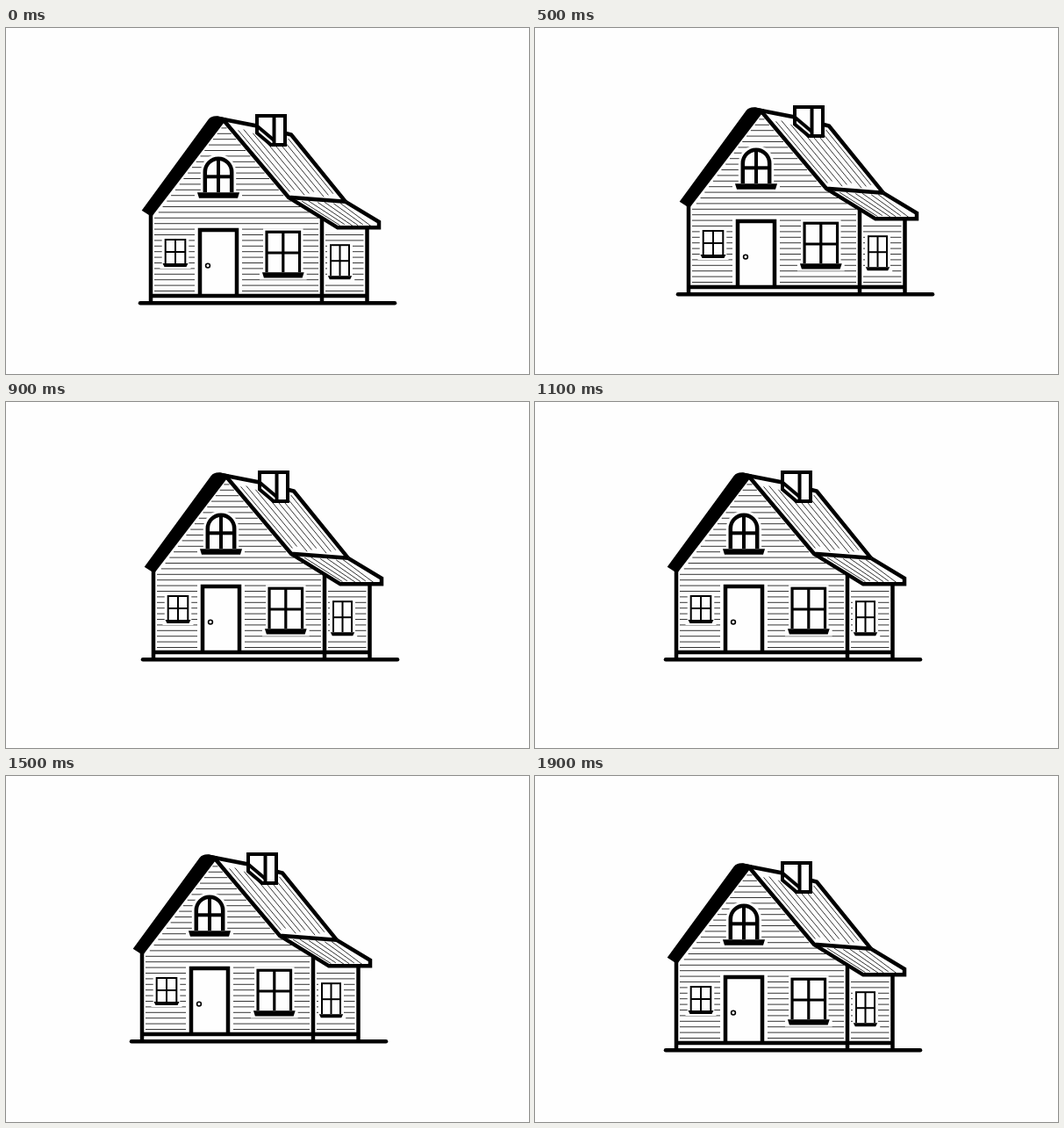
An HTML page with a canvas for the animation above (2 s loop, 596 by 394 pixels).

```html
<!DOCTYPE html>
<html lang="en">
<head>
<meta charset="utf-8">
<title>Floating house</title>
<style>
html, body { margin: 0; width: 100%; height: 100%; overflow: hidden; background: #fefefe; }
canvas { display: block; }
</style>
</head>
<body>
<canvas id="stage" width="596" height="394"></canvas>
<script>
const stage = document.getElementById('stage');
const ctx = stage.getContext('2d');
const INK = '#000', PAPER = '#fefefe';
const LOOP = 2000, STEPS = 20, RADIUS = 10;
const BOLD = 4.5, FINE = 0.8, GAP = 4;

// Walls
const LEFT = 165, POST = 360, RIGHT = 411.5, FLOOR = 305, GROUND = 313.2;
const ROW = 6.4;

// Roof corners
const PEAK = [248, 105], RIDGE = [325, 121.5];
const VALLEY = [322, 192.8], EAVE = [387, 197.8];
const PORCH = [378, 227.3], TIP = [425, 227.3];
const TIP_TOP = [TIP[0], TIP[1] - 6.5];
const GABLE_FOOT = [LEFT + 1, 215];

const mix = (a, b, k) => [a[0] + (b[0] - a[0]) * k, a[1] + (b[1] - a[1]) * k];
const xAt = (a, b, y) => mix(a, b, (y - a[1]) / (b[1] - a[1]))[0];

function trace(points, closed) {
  ctx.beginPath();
  for (const point of points) ctx.lineTo(...point);
  if (closed) ctx.closePath();
}

function line(width, ...points) {
  trace(points);
  ctx.lineWidth = width;
  ctx.stroke();
}

function fill(color) {
  ctx.fillStyle = color;
  ctx.fill();
}

function clear(x, y, w, h) {
  ctx.fillStyle = PAPER;
  ctx.fillRect(x, y, w, h);
}

// Parallel lines from edge a-b to edge c-d, with uneven ends
function hatch(a, b, c, d, count) {
  for (let i = 1; i < count; i++) {
    const top = mix(a, b, i / count), foot = mix(c, d, i / count);
    line(FINE, mix(top, foot, 0.08 + i % 2 * 0.03), mix(top, foot, 0.95 - i % 3 * 0.03));
  }
}

function siding() {
  for (let y = FLOOR - 5.5; y > PEAK[1] + 8; y -= ROW) {
    const left = Math.max(LEFT, xAt(PEAK, GABLE_FOOT, y)) + GAP;
    const slope = y < VALLEY[1] ? xAt(PEAK, VALLEY, y) : xAt(VALLEY, PORCH, y);
    const right = Math.min(POST, slope) - GAP;
    if (right > left) line(FINE, [left, y], [right, y]);
    if (y > PORCH[1] + GAP) line(FINE, [POST + GAP, y], [RIGHT - GAP, y]);
  }
}

function sill(cx, y, w, depth) {
  clear(cx - w / 2 - 3, y, w + 6, depth + 2);
  trace([[cx - w / 2, y], [cx + w / 2, y], [cx + w / 2 - 2, y + depth], [cx - w / 2 + 2, y + depth]]);
  fill(INK);
}

function pane(cx, cy, w, h, weight) {
  const x = cx - w / 2, y = cy - h / 2;
  clear(x - GAP, y - GAP, w + GAP * 2, h + GAP * 2);
  ctx.lineWidth = weight;
  ctx.strokeRect(x, y, w, h);
  line(weight, [cx, y], [cx, y + h]);
  line(weight, [x, cy], [x + w, cy]);
  sill(cx, y + h - weight / 2, w + weight * 3.2, weight * 2);
}

function archWindow(cx, cy, r, foot) {
  const arch = radius => {
    ctx.beginPath();
    ctx.moveTo(cx - radius, foot);
    ctx.arc(cx, cy, radius, Math.PI, 0);
    ctx.lineTo(cx + radius, foot);
  };
  arch(r + GAP + 1);
  fill(PAPER);
  arch(r);
  ctx.lineWidth = BOLD;
  ctx.stroke();
  line(4, [cx, cy - r], [cx, foot]);
  line(4, [cx - r, cy + 5.3], [cx + r, cy + 5.3]);
  sill(cx, foot, r * 3.16, 6.5);
}

function door(x, y, w) {
  clear(x - GAP - 2, y - GAP, w + GAP * 2 + 4, FLOOR - y);
  line(BOLD, [x, FLOOR], [x, y], [x + w, y], [x + w, FLOOR]);
  ctx.beginPath();
  ctx.arc(x + 9, y + 40.6, 2.4, 0, Math.PI * 2);
  ctx.lineWidth = 1.6;
  ctx.stroke();
}

function frame() {
  line(BOLD, [LEFT, GABLE_FOOT[1] - 7], [LEFT, GROUND]);
  line(BOLD, [POST, 216], [POST, GROUND]);
  line(BOLD, [RIGHT, PORCH[1]], [RIGHT, GROUND]);
  line(BOLD, [LEFT, FLOOR], [RIGHT, FLOOR]);
  ctx.lineCap = 'round';
  line(BOLD, [LEFT - 12, GROUND], [RIGHT + 31.5, GROUND]);
  ctx.lineCap = 'butt';
}

function roof() {
  hatch(PEAK, RIDGE, VALLEY, EAVE, 9);
  hatch(VALLEY, EAVE, PORCH, TIP, 7);
  line(BOLD, [240, 102.5], [286, 111.5], RIDGE, EAVE);
  line(BOLD, PEAK, VALLEY, EAVE);
  line(BOLD, VALLEY, PORCH, TIP, TIP_TOP, EAVE);

  // Thick left slope with a rounded top
  ctx.beginPath();
  ctx.moveTo(154.7, 207.7);
  ctx.lineTo(230.7, 104);
  ctx.quadraticCurveTo(234, 100, 240, 100.3);
  ctx.lineTo(PEAK[0] + 3, 102.5);
  ctx.lineTo(PEAK[0] + 1, PEAK[1] + 2);
  ctx.lineTo(...GABLE_FOOT);
  fill(INK);
}

function chimney(x, y, w, h) {
  const divider = x + w * 0.61;
  trace([[x, y], [x + w, y], [x + w, y + h], [x + w / 2, y + h], [x, y + h - 13.5]], true);
  fill(PAPER);
  ctx.lineWidth = 4;
  ctx.stroke();
  line(4, [x, y + 11.5], [divider, y + 28]);
  line(4, [divider, y], [divider, y + h]);
}

function house() {
  siding();
  archWindow(242, 164, 15.2, 187.2);
  pane(193, 255, 22.6, 28, 2);
  pane(315.8, 256, 37.5, 47.5, 3.2);
  pane(380.5, 265.2, 21, 36, 2);
  door(221, 230, 42);
  frame();
  roof();
  chimney(286, 100, 32, 33);
}

function draw() {
  const step = Math.floor(performance.now() % LOOP / LOOP * STEPS);
  const angle = 2 * Math.PI * step / STEPS;
  clear(0, 0, stage.width, stage.height);
  ctx.save();
  // The house circles in whole pixels
  ctx.translate(
    Math.floor(RADIUS * Math.sin(angle)),
    Math.floor(RADIUS * Math.cos(angle) - RADIUS)
  );
  house();
  ctx.restore();
  requestAnimationFrame(draw);
}
draw();
</script>
</body>
</html>
```
